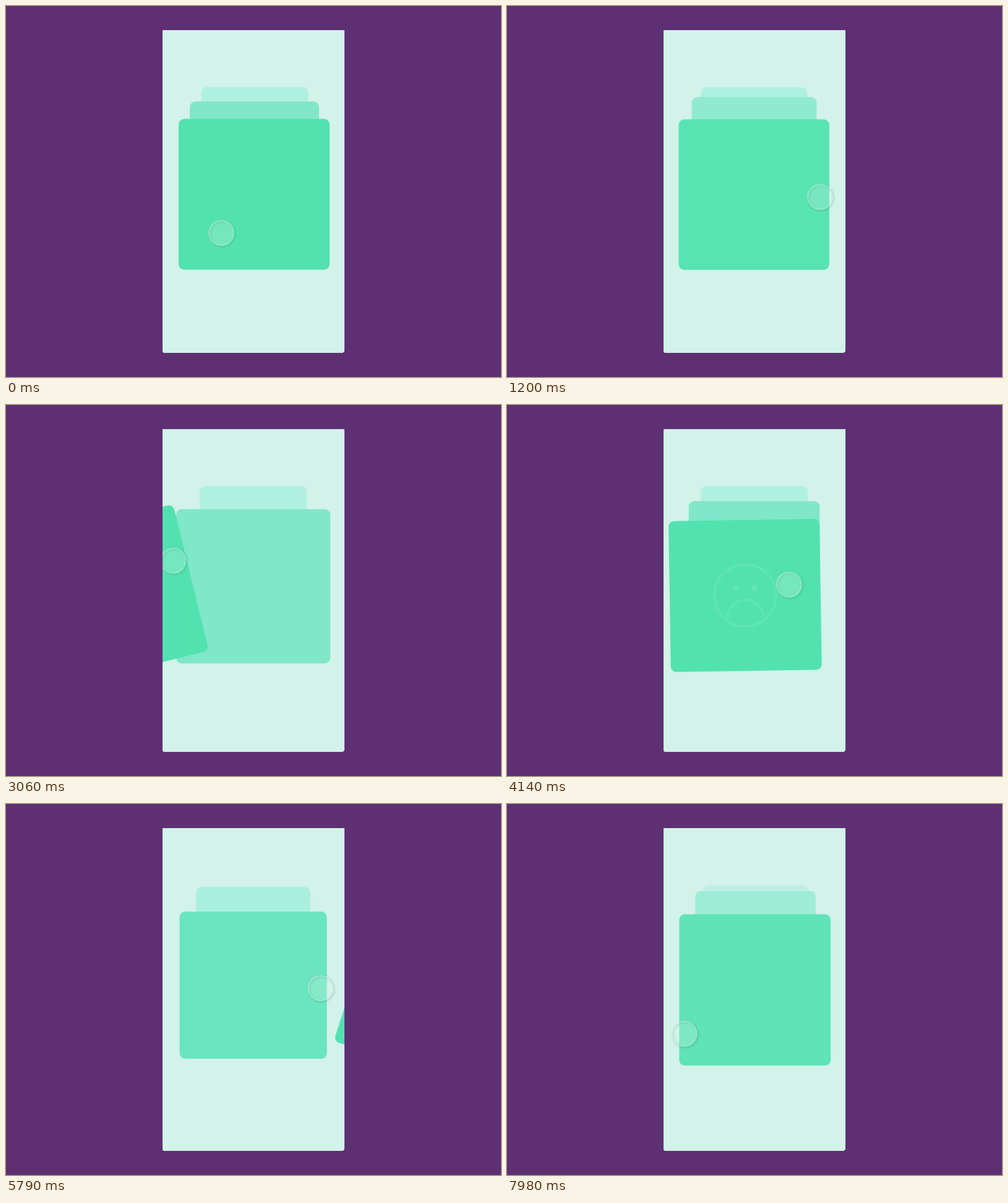
Write an HTML page that moves like this. It is 800 px wide and 600 px high and loops after 8000 ms.

```html
<!DOCTYPE html>
<html lang="en">
<head>
<meta charset="utf-8">
<title>Swipe cards</title>
<style>
html, body { margin: 0; width: 100%; height: 100%; overflow: hidden; background: #5e2f73; }
svg { display: block; width: 100vw; height: 100vh; }
.face { fill: none; stroke: #fff; stroke-width: 4; stroke-linecap: round; }
.eye { fill: #fff; stroke: none; }
</style>
</head>
<body>
<svg viewBox="0 0 800 600">
  <defs>
    <clipPath id="screen"><rect x="253" y="39" width="294" height="522"/></clipPath>
    <filter id="soft" x="-50%" y="-50%" width="200%" height="200%"><feGaussianBlur stdDeviation="1.5"/></filter>
  </defs>
  <rect width="800" height="600" fill="#5e2f73"/>
  <path d="M543 557H547V561H543Z" fill="#2b1a35"/>
  <path d="M253 39H547V557Q547 561 543 561H256Q253 561 253 558Z" fill="#d3f2e9"/>
  <g clip-path="url(#screen)">
    <g id="cards"></g>
    <g id="touch">
      <circle cx="1.5" cy="1.5" r="20" fill="none" stroke="#256b55" stroke-opacity=".3" stroke-width="2" filter="url(#soft)"/>
      <circle r="20" fill="#d3f2e9" fill-opacity=".26" stroke="#e4faf2" stroke-opacity=".5" stroke-width="1.5"/>
    </g>
  </g>
</svg>
<script>
const LOOP = 8000, SETTLE = 500, REACH = 217;
const FRONT = [82, 226, 176], SECOND = [128, 231, 201], THIRD = [176, 240, 224];

// Each swipe drags the pointer between two points
const swipes = [
  { start: 0, end: 880, from: [348, 367], to: [510, 317] },
  { start: 2010, end: 3110, from: [489, 276], to: [255, 250] },
  { start: 4000, end: 4712, from: [470, 290], to: [310, 296] },
  { start: 4970, end: 5650, from: [383, 300], to: [510, 298] },
  { start: 6810, end: 7745, from: [472, 294], to: [268, 373] }
];
swipes.push({ ...swipes[0], start: LOOP + 500, end: LOOP + 1380 });

// Before a swipe to the right the stack rests slightly higher and to the right
for (const s of swipes) {
  s.reach = s.to[0] - s.from[0];
  const right = s.reach > 0;
  s.x = right ? 401 : 399;
  s.top = right ? 182.5 : 186;
  s.shift = right ? 2.5 : 0;
}

const clamp = v => Math.max(0, Math.min(1, v));
const mix = (a, b, u) => a + (b - a) * u;
const blend = (a, b, u) => a.map((v, i) => Math.round(mix(v, b[i], u)));
const smooth = u => u * u * (3 - 2 * u);
const dragEase = (s, t) => clamp((t - s.start) / (s.end - s.start)) ** 1.5;
const pull = dx => Math.abs(dx) / REACH;

function make(tag, attrs, parent) {
  const el = document.createElementNS('http://www.w3.org/2000/svg', tag);
  setAll(el, attrs);
  return parent.appendChild(el);
}

function setAll(el, attrs) {
  for (const k in attrs) el.setAttribute(k, attrs[k]);
}

function makeCard() {
  const g = make('g', {}, document.getElementById('cards'));
  const rect = make('rect', { rx: 9 }, g);
  const face = make('g', { class: 'face', opacity: 0 }, g);
  make('circle', { r: 50 }, face);
  for (const x of [-15, 15]) make('circle', { class: 'eye', cx: x, cy: -12, r: 5 }, face);
  return { g, rect, face, mouth: make('path', {}, face) };
}

function drawCard(card, { x, top, size, color, dx = 0, opacity = 1 }) {
  const h = size / 2;
  setAll(card.g, { transform: `translate(${x + dx} ${top + h}) rotate(${dx * 0.063})`, opacity });
  setAll(card.rect, { x: -h, y: -h, width: size, height: size, fill: `rgb(${color})` });
  setAll(card.face, { opacity: clamp((Math.abs(dx) - 10) / 50) });
  setAll(card.mouth, { d: dx < 0 ? 'M-28.5 34A28.5 27 0 0 1 28.5 34' : 'M-28.5 7A28.5 27 0 0 0 28.5 7' });
}

const [third, second, front, flying] = Array.from({ length: 4 }, makeCard);
const touch = document.getElementById('touch');

function pointer(now, last, t) {
  if (t >= now.start) return blendPoint(now.from, now.to, dragEase(now, t));
  return blendPoint(last.to, now.from, smooth((t - last.end) / (now.start - last.end)));
}

const blendPoint = (a, b, u) => a.map((v, i) => mix(v, b[i], u));

function render(t) {
  const i = swipes.findIndex(s => t < s.end);
  const now = swipes[i], last = swipes[i - 1] || now;
  const since = i ? t - last.end : LOOP;
  const s = 1 - (1 - clamp(since / SETTLE)) ** 2, late = s ** 2.7;
  const dx = now.reach * dragEase(now, t);
  const grown = pull(last.reach), p = pull(dx);

  drawCard(third, {
    x: 399.5 + now.shift, top: mix(134, 131, s), size: mix(165, 173, s),
    color: THIRD, opacity: clamp((s - 0.66) / 0.1)
  });
  drawCard(second, {
    x: 399.5 + now.shift * 0.8, top: mix(131, 154.5, late) + 14 * p,
    size: mix(173, 209, s ** 1.6) + 40 * p, color: blend(THIRD, SECOND, late)
  });
  drawCard(front, {
    x: mix(400, now.x, s), top: mix(154.5 + 14 * grown, now.top, s),
    size: mix(209 + 40 * grown, 244, s), color: blend(SECOND, FRONT, s), dx
  });

  const flies = i > 0 && since < 320;
  flying.g.style.display = flies ? '' : 'none';
  if (flies) drawCard(flying, {
    x: last.x, top: last.top, size: 244, color: FRONT,
    dx: last.reach + Math.sign(last.reach) * since * 1.1
  });

  setAll(touch, { transform: `translate(${pointer(now, last, t)})` });
}

const begin = performance.now();
function tick() {
  render((performance.now() - begin) % LOOP);
  requestAnimationFrame(tick);
}
tick();
</script>
</body>
</html>
```
